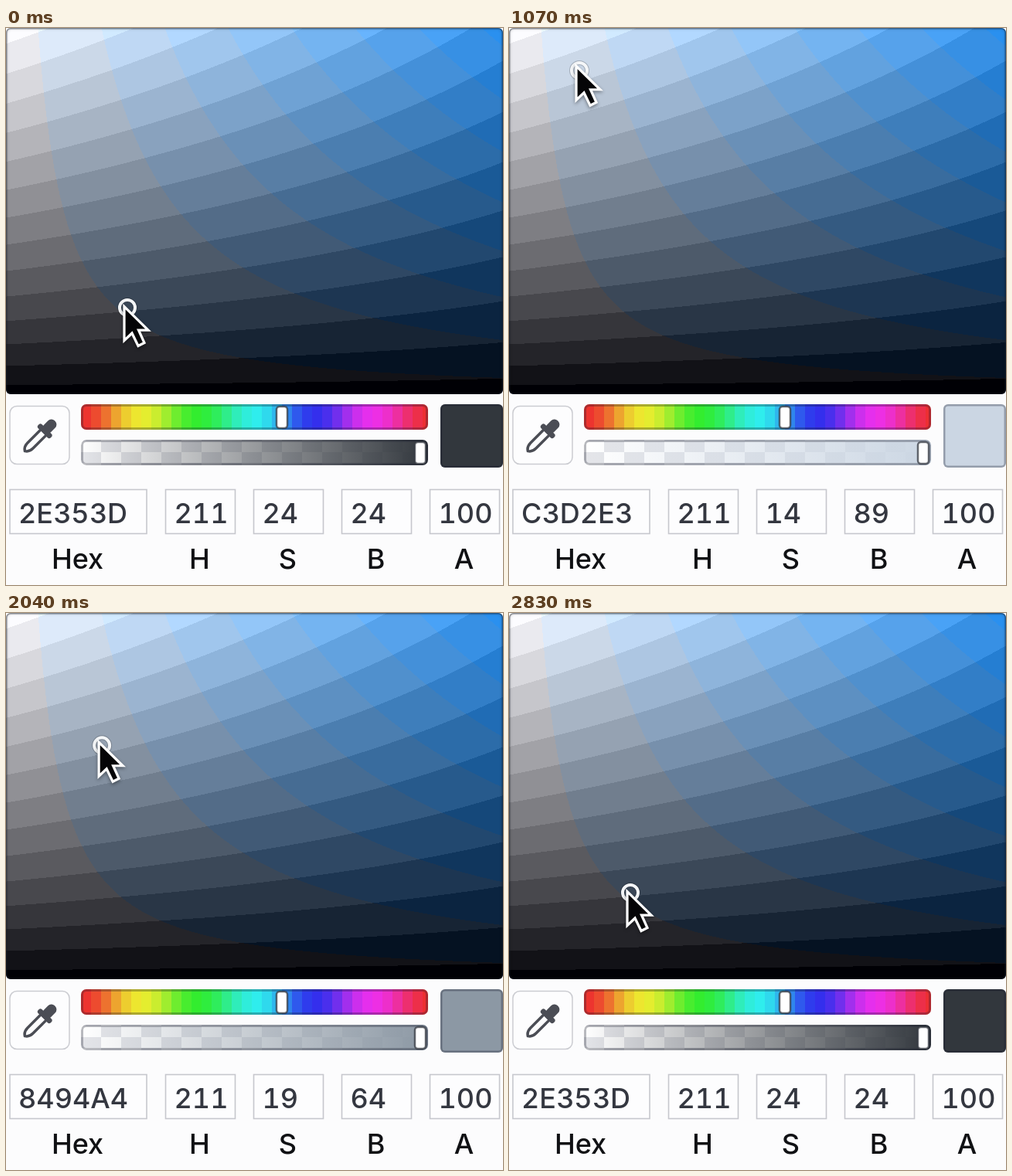
Write an HTML page with a canvas that moves like this. It is 643x721 px and loops after 2930 ms.

```html
<!DOCTYPE html>
<html lang="en">
<head>
<meta charset="utf-8">
<title>Colour picker</title>
<style>
html, body { margin: 0; width: 100%; height: 100%; overflow: hidden; background: #fcfcfd; }
body > * { position: absolute; box-sizing: border-box; }
#field { left: 0; top: 0; border-radius: 6px; }
#edge { left: 0; top: 0; width: 643px; height: 474px; border-radius: 6px;
  box-shadow: inset 0 0 0 1.5px rgba(20,30,45,.4), inset 0 0 4px rgba(0,0,0,.4); }
.bar { left: 97px; width: 449px; height: 33px; border-radius: 7px;
  box-shadow: inset 0 0 0 3px rgba(20,25,40,.3); }
#hue { top: 487px; }
#alpha { top: 533px; background: linear-gradient(90deg, transparent, var(--c)),
  conic-gradient(#e4e5e9 25%, #fff 0 50%, #e4e5e9 0 75%, #fff 0) 0 2px / 52px 28px; }
#swatch { left: 562px; top: 487px; width: 81px; height: 82px; border-radius: 6px;
  background: var(--c); box-shadow: inset 0 0 0 2.5px rgba(20,25,40,.3); }
svg { left: 0; top: 0; }
text { font: 450 36px Inter, "Liberation Sans", sans-serif; font-variant-numeric: tabular-nums; }
</style>
</head>
<body>
<canvas id="field" width="643" height="474"></canvas>
<div id="edge"></div>
<div id="hue" class="bar"></div>
<div id="alpha" class="bar"></div>
<div id="swatch"></div>
<svg width="643" height="721">
  <rect x="5" y="489.5" width="77" height="75" rx="9" fill="#fdfdfe" stroke="#cbccd1" stroke-width="1.5"/>
  <g transform="translate(43.5 528.5) rotate(45)" fill="#4b4d55">
    <rect x="-6.5" y="-28" width="13" height="20" rx="6"/>
    <rect x="-11.5" y="-13" width="23" height="7" rx="3"/>
    <path d="M-5-8V17Q-5 24 0 27Q5 24 5 17V-8" fill="none" stroke="#4b4d55" stroke-width="3.5"/>
  </g>
  <g fill="#fff" stroke="#343840" stroke-opacity=".75" stroke-width="2.5">
    <rect x="350" y="490" width="14" height="28" rx="4"/>
    <rect x="529" y="536" width="14" height="28" rx="4"/>
  </g>
  <g id="inputs"></g>
  <g id="ring" fill="none">
    <circle r="10" stroke="#000" stroke-opacity=".2" stroke-width="6"/>
    <circle r="10" stroke="#f4f6f8" stroke-width="4"/>
  </g>
  <path id="cursor" d="M2 4V48L12 38.5L20 55L28 51L20.5 34.5H33Z" fill="#050507" stroke="#fff" stroke-width="3.2"
    style="filter:drop-shadow(0 2px 2px rgba(0,0,0,.4))"/>
</svg>
<script>
const $ = id => document.getElementById(id);
const WIDTH = 643, HEIGHT = 474, DEPTH = 471, LOOP = 2930, HUE = 211;

function hsv(h, s, v) {
  return [5, 3, 1].map(n => {
    const k = (n + h / 60) % 6;
    return Math.round(255 * v * (1 - s * Math.max(0, Math.min(k, 4 - k, 1))));
  });
}

const snap = (value, step) => Math.round(value / step) * step;

// Saturation runs right, brightness up; lightness and chroma are posterised
function drawField() {
  const ctx = $('field').getContext('2d');
  const image = ctx.createImageData(WIDTH, HEIGHT);
  for (let y = 0, i = 0; y < HEIGHT; y++) {
    const v = Math.max(0, 1 - y / DEPTH) ** .85;
    for (let x = 0; x < WIDTH; x++, i += 4) {
      const s = x / WIDTH;
      const light = snap(v * (252 - 106 * s), 18);
      const chroma = snap(v * s * 188, 24);
      image.data.set([light - .53 * chroma, light, light + .47 * chroma + 5, 255], i);
    }
  }
  ctx.putImageData(image, 0, 0);
}

// Hue bands linger on the six pure colours
function drawHue() {
  const bands = [];
  for (let x = 0; x < 449; x += 13) {
    const h = (x + 4) / 449 * 360;
    const rgb = hsv(h - 5 * Math.sin(h * Math.PI / 30), .8, .93);
    bands.push(`rgb(${rgb}) ${x}px ${x + 13}px`);
  }
  $('hue').style.background = `linear-gradient(90deg, ${bands})`;
}

const inputs = [...'HSBA'].map((name, i) => [name, 206.5 + 114 * i, 90]);
inputs.unshift(['Hex', 5, 177]);
$('inputs').innerHTML = inputs.map(([name, x, w]) => `
  <rect x="${x}" y="597.5" width="${w}" height="57" fill="#fdfdfe" stroke="#c6c7cd" stroke-width="1.6"/>
  <text id="${name}" x="${x + 11}" y="641" fill="#343740"></text>
  <text x="${x + w / 2 - 1}" y="699.5" text-anchor="middle" fill="#101114">${name}</text>`).join('');

// Time and picked point; the pointer eases from one to the next
const dark = [157, 362], pale = [88, 55], bluer = [100.5, 61.1];
const keys = [
  [0, ...dark], [700, ...dark], [1070, 91, 55], [1450, ...pale], [1500, ...pale],
  [1800, ...bluer], [1900, ...bluer], [2240, 163.8, 356.5], [2420, ...dark], [LOOP, ...dark]
];

function pickAt(t) {
  const i = keys.findIndex(k => k[0] > t);
  const [t0, x0, y0] = keys[i - 1], [t1, x1, y1] = keys[i];
  const u = (t - t0) / (t1 - t0), e = u * u * (3 - 2 * u);
  return [x0 + (x1 - x0) * e, y0 + (y1 - y0) * e];
}

function frame(now) {
  const [x, y] = pickAt(now % LOOP);
  const s = x / WIDTH, b = 1 - (y - 3) / DEPTH;
  const hex = hsv(HUE, s, b).map(n => n.toString(16).padStart(2, '0')).join('').toUpperCase();
  const values = [hex, HUE, Math.round(s * 100), Math.round(b * 100), 100];
  inputs.forEach(([name], i) => $(name).textContent = values[i]);
  document.body.style.setProperty('--c', `rgb(${hsv(HUE, s * .75, b)})`);
  $('ring').setAttribute('transform', `translate(${x} ${y})`);
  $('cursor').setAttribute('transform', `translate(${x - 6} ${y - 10.5 + y / 72})`);
  requestAnimationFrame(frame);
}

drawField();
drawHue();
frame(0);
</script>
</body>
</html>
```
